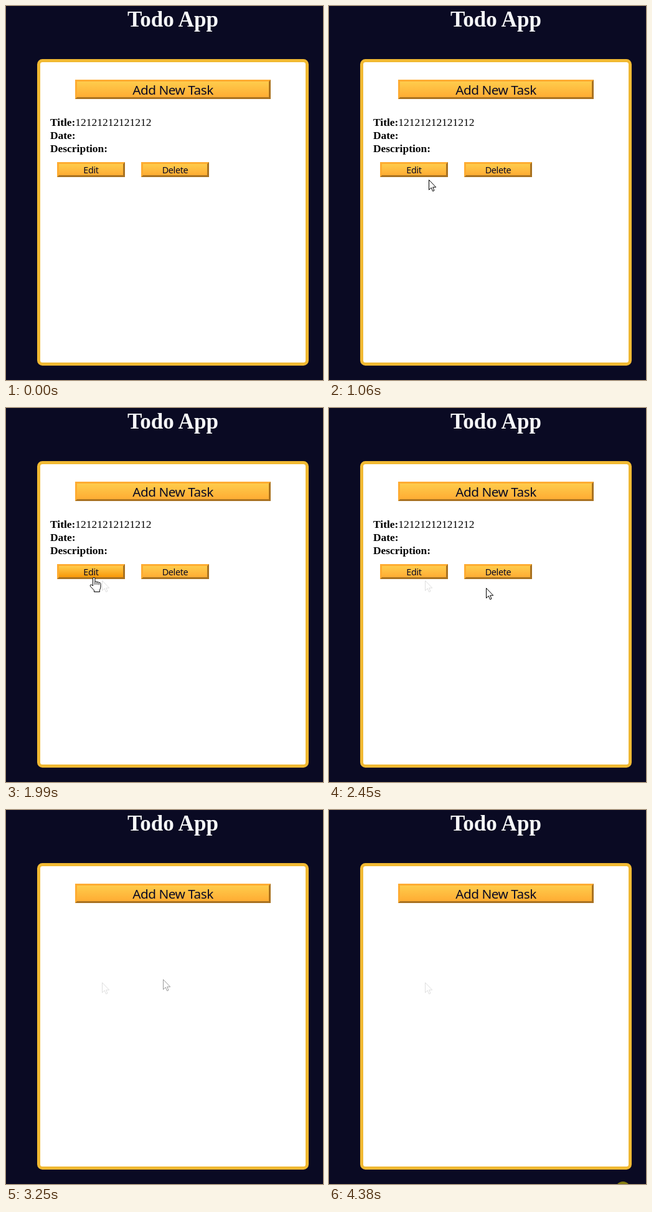
Write an HTML page that moves like this. It is 509 by 599 pixels and loops after 4.51 s.

```html
<!DOCTYPE html>
<html lang="en">
<head>
<meta charset="utf-8">
<title>Todo App</title>
<style>
  html, body { margin: 0; width: 100%; height: 100%; overflow: hidden; background: #0a0a23; }
  svg { display: block; width: 509px; height: 599px; }
  .serif { font: 17.45px "Liberation Serif", "Times New Roman", serif; }
  .serif tspan, .title { font-weight: bold; }
  .title { font-size: 35.1px; }
  .label { font-family: "Noto Sans", sans-serif; letter-spacing: -.025em; text-anchor: middle; fill: #0a0a23; }
  .pointer { fill: #fff; stroke: #000; stroke-linejoin: round; }
</style>
</head>
<body>
<svg viewBox="0 0 509 599">
  <defs>
    <linearGradient id="plain" x2="0" y2="1"><stop stop-color="#fecc4c"/><stop offset="1" stop-color="#ffac33"/></linearGradient>
    <linearGradient id="hover" x2="0" y2="1"><stop stop-color="#ffcc4c"/><stop offset="1" stop-color="#f89808"/></linearGradient>
    <path id="arrowShape" d="M.5 .5V16.5L4.2 13 6.6 18.6 9 17.6 6.7 12.2H11.7Z"/>
  </defs>

  <text class="serif title" x="268" y="33" text-anchor="middle" fill="#f5f6f7">Todo App</text>
  <rect x="52.5" y="87.5" width="431" height="486" rx="6" fill="#fff" stroke="#f1b932" stroke-width="5"/>
  <g id="main"></g>
  <g id="task">
    <g class="serif">
      <text x="71" y="192"><tspan>Title:</tspan>12121212121212</text>
      <text x="71" y="213"><tspan>Date:</tspan></text>
      <text x="71" y="234"><tspan>Description:</tspan></text>
    </g>
  </g>

  <use id="trail" href="#arrowShape" x="154" y="276" fill="#fff" stroke="#dedede"/>
  <circle id="marker" r="12" fill="#f5e600" fill-opacity=".52"/>
  <g id="arrow" class="pointer"><use href="#arrowShape"/></g>
  <g id="hand" class="pointer">
    <path transform="translate(-6 0)" d="M5.5 14V2.2a1.7 1.7 0 0 1 3.4 0V7.5q.3-.8 1.6-.8t1.6 1.3q.4-.6 1.5-.5t1.5 1.2q.4-.5 1.4-.2 1.5.4 1.5 2V15q0 3-1.6 5.5V23.5H7.5V21L2 15.3Q.4 13.2 1.6 12.3t2.6.3ZM8.9 7.5v4.5M12.1 8v4M15.1 8.7v3.6"/>
  </g>
</svg>
<script>
const LOOP = 4510;
const FIRST = 188, STEP = 66.5;
const EDIT_CLICK = 1455, REMOVED = 3110, LEAVE = 3510, GONE = 3830, LAST_CLICK = 4370;
const LIGHT = '#feac32', DARK = '#a97221';
const $ = id => document.getElementById(id);
const show = (el, on) => { el.style.display = on ? '' : 'none'; };
const move = (el, x, y) => el.setAttribute('transform', `translate(${x} ${y})`);

// Beveled button with a hit test and a setter for its look.
function button(parent, x, y, w, h, label, size, baseline) {
  const g = document.createElementNS('http://www.w3.org/2000/svg', 'g');
  move(g, x, y);
  g.innerHTML = `
    <rect width="${w}" height="${h}"/>
    <path d="M0 ${h}V0H${w}L${w - 3} 3H3V${h - 3}Z"/>
    <rect x="3" y="3" width="${w - 6}" height="${h - 6}"/>
    <text class="label" x="${w / 2}" y="${baseline - y}" font-size="${size}">${label}</text>`;
  parent.append(g);
  const [low, high, face] = g.querySelectorAll('rect, path');
  return {
    contains: (px, py) => px >= x && px < x + w && py >= y && py < y + h,
    paint(over, down) {
      low.setAttribute('fill', down ? LIGHT : DARK);
      high.setAttribute('fill', down ? DARK : LIGHT);
      face.setAttribute('fill', `url(#${over ? 'hover' : 'plain'})`);
    }
  };
}

button($('main'), 111, 118, 314, 31, 'Add New Task', 20.8, 142).paint();
const edit = button($('task'), 82, 250, 109, 24, 'Edit', 14.4, 268);
const del = button($('task'), 217, 250, 109, 24, 'Delete', 14.4, 268);

// Key points of the pointer's walk: time, x, y
const walk = [
  [FIRST, 439, 588], [660, 280, 321], [990, 167, 281], [1190, 144, 271],
  [1850, 144, 271], [1990, 140, 271], [2055, 140, 271], [2250, 190, 294],
  [2450, 252, 288], [2650, 252, 271], [LEAVE, 252, 271]
];

function pointerAt(t) {
  const i = walk.findIndex(key => key[0] > t);
  if (i < 0) {                            // speeds up on its way out
    const p = (t - LEAVE) / 270;
    return [252 + 129 * p ** 1.5, 271 + 289 * p ** 1.5];
  }
  const [t0, x0, y0] = walk[i - 1], [t1, x1, y1] = walk[i];
  const p = (t - t0) / (t1 - t0);
  return [x0 + (x1 - x0) * p, y0 + (y1 - y0) * p].map(Math.round);
}

function draw(time) {
  const t = FIRST + Math.floor((time - FIRST) / STEP) * STEP;
  const visible = t >= FIRST && t < GONE;
  const [x, y] = visible ? pointerAt(t) : [0, 0];
  const hasTask = t < REMOVED;
  const overEdit = hasTask && edit.contains(x, y);
  const overDelete = hasTask && del.contains(x, y);
  const asHand = overEdit || overDelete;

  show($('arrow'), visible && !asHand);
  show($('hand'), visible && asHand);
  move($('arrow'), x, y);
  move($('hand'), x, y);
  $('arrow').style.stroke = t > REMOVED && t < LEAVE ? '#999' : '#000';

  const held = t - EDIT_CLICK;
  edit.paint(overEdit, held > STEP / 2 && held < 4 * STEP);
  del.paint(overDelete);
  show($('task'), hasTask);
  show($('trail'), t > 1110);

  // The click marker fades after the press.
  const late = t >= LAST_CLICK;
  const glow = late ? 1 : held < 0 ? 0 : Math.min(1, Math.max(0, 1.5 - held / 260));
  $('marker').setAttribute('opacity', glow);
  move($('marker'), late ? 472 : 144, late ? 607 : 271);
}

const start = performance.now();
function tick() {
  draw((performance.now() - start) % LOOP);
  requestAnimationFrame(tick);
}
tick();
</script>
</body>
</html>
```
